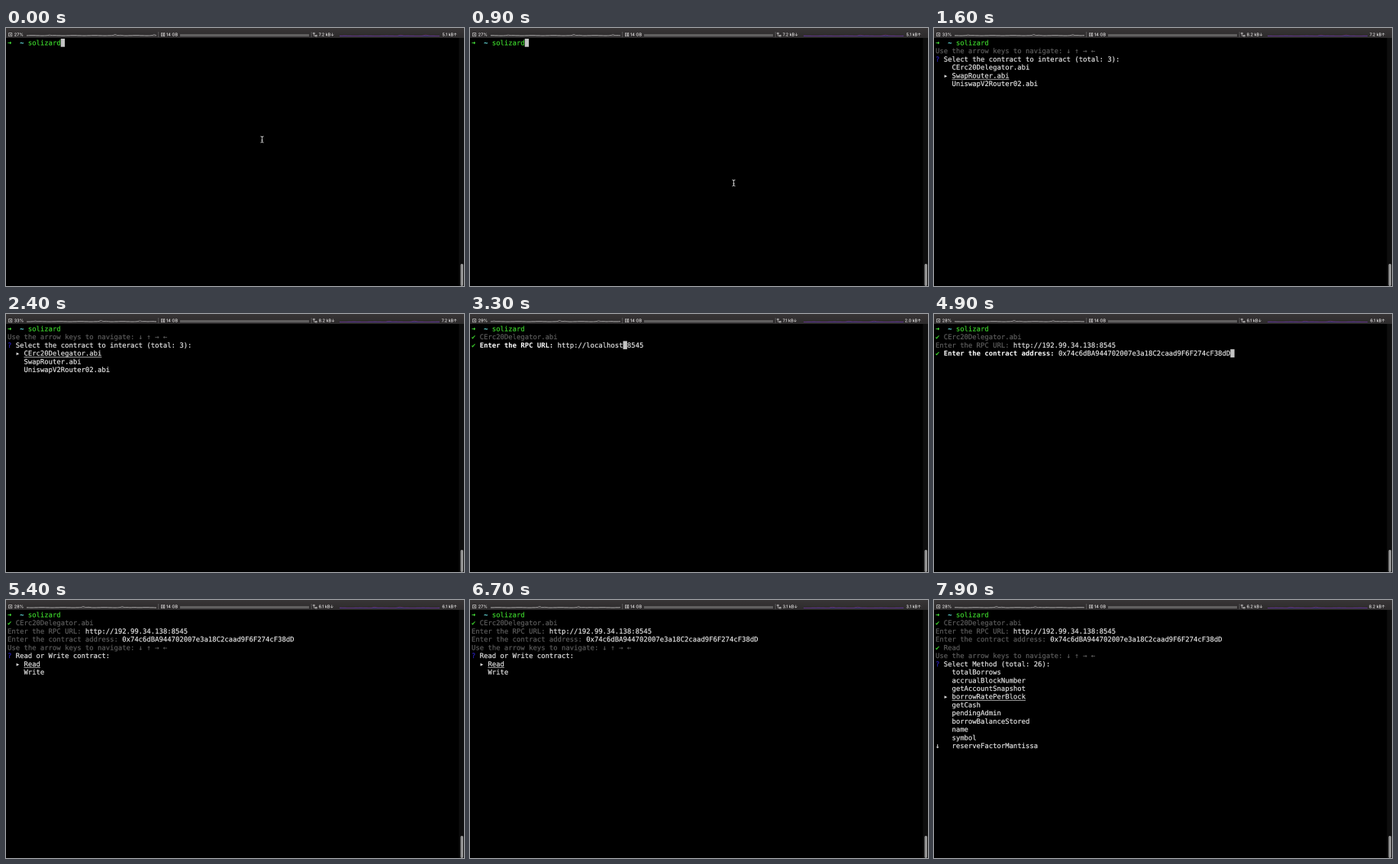
An HTML page with a canvas for the animation above (8000 ms loop, 600x338 px).

```html
<!DOCTYPE html>
<html lang="en">
<head>
<meta charset="utf-8">
<title>Terminal session</title>
<style>
html, body { margin: 0; width: 100%; height: 100%; overflow: hidden; background: #000; }
canvas { display: block; width: 600px; height: 338px; }
</style>
</head>
<body>
<canvas id="stage"></canvas>
<script>
const LOOP = 8000, W = 600, H = 338;
const CELL = 5.365, LINE = 10.72, LEFT = 2, TOP = 14;
const MONO = '8.912px "DejaVu Sans Mono", "Liberation Mono", monospace';
const UI = '500 5.5px Inter, "Open Sans", sans-serif';
const GREEN = '#3bcf2b', GRAY = '#5b5b5b', TEXT = '#dedede', WHITE = '#ffffff';

// Drawn at double size, so text keeps its fractional position when scaled down
const canvas = document.getElementById('stage');
const scale = 2 * (window.devicePixelRatio || 1);
canvas.width = W * scale;
canvas.height = H * scale;
const ctx = canvas.getContext('2d');
ctx.scale(scale, scale);
ctx.textRendering = 'geometricPrecision';
ctx.lineJoin = 'round';

const contracts = ['CErc20Delegator.abi', 'SwapRouter.abi', 'UniswapV2Router02.abi'];
const methods = ['totalBorrows', 'accrualBlockNumber', 'getAccountSnapshot', 'borrowRatePerBlock',
  'getCash', 'pendingAdmin', 'borrowBalanceStored', 'name', 'symbol', 'reserveFactorMantissa'];
const host = 'localhost', ip = '192.99.34.138', port = ':8545';
const address = '0x74c6dBA944702007e3a18C2caad9F6F274cF38dD';

// [start ms, CPU, download, upload]
const stats = [[0, '27%', '7.2', '5.1'], [1000, '33%', '8.2', '7.2'], [2700, '29%', '7.1', '2.0'],
  [3700, '27%', '17', '13'], [4700, '28%', '6.1', '6.1'], [5900, '27%', '3.1', '3.1'], [7100, '28%', '6.2', '8.2']];

// [start ms, chosen item]
const contractKeys = [[1000, 0], [1400, 1], [1900, 2], [2200, 1], [2400, 0]];
const modeKeys = [[5100, 0], [5800, 1], [6200, 0]];
const methodKeys = [[7000, 0], [7300, 1], [7400, 2], [7500, 3], [7600, 4], [7800, 3]];

const latest = (list, t) => list.filter(e => e[0] <= t).pop() || list[0];
const clamp = (v, a, b) => Math.min(b, Math.max(a, v));

function rect(x, y, w, h, color) {
  ctx.fillStyle = color;
  ctx.fillRect(x, y, w, h);
}

// A hairline stroke gives the glyphs a slightly heavier weight
function put(row, col, text, color = TEXT, bold = false) {
  ctx.font = (bold ? 'bold ' : '') + MONO;
  ctx.fillStyle = ctx.strokeStyle = color;
  ctx.lineWidth = 0.22;
  const y = TOP + 8.5 + row * LINE;
  [...text].forEach((ch, i) => {
    if (ch === ' ') return;
    const x = LEFT + (col + i) * CELL;
    ctx.fillText(ch, x, y);
    if (!bold) ctx.strokeText(ch, x, y);
  });
}

function cursor(row, col) {
  rect(LEFT + col * CELL, TOP + row * LINE, CELL, LINE, '#c4c4c4');
}

function done(row, text) {
  put(row, 0, '✔', GREEN, true);
  put(row, 2, text, GRAY);
}

function answered(row, label, value) {
  put(row, 0, label, GRAY);
  put(row, label.length + 1, value);
}

function prompt(row, label, value, at) {
  put(row, 0, '✔', GREEN, true);
  put(row, 2, label, WHITE, true);
  const col = label.length + 3;
  put(row, col, value);
  cursor(row, col + at);
}

function menu(row, label, items, chosen) {
  put(row, 0, 'Use the arrow keys to navigate: ↓ ↑ → ←', GRAY);
  put(row + 1, 0, '?', '#2a20b8');
  put(row + 1, 2, label);
  items.forEach((item, i) => {
    const r = row + 2 + i;
    put(r, 4, item);
    if (i === chosen) {
      put(r, 2, '▸');
      rect(LEFT + 4 * CELL, TOP + r * LINE + 10, item.length * CELL, 0.7, TEXT);
    }
  });
}

function rpcPrompt(t) {
  const label = 'Enter the RPC URL:', base = 'http://';
  const back = clamp(Math.floor((t - 2700) / 100), 0, port.length);
  const cut = clamp(Math.floor((t - 3350) / 40), 0, host.length);
  const name = t < 3800 ? host.slice(0, host.length - cut) : ip;
  const value = base + name + port;
  prompt(2, label, value, value.length - back);
}

function terminal(t) {
  put(0, 0, '➜', '#48e83c', true);
  put(0, 3, '~', '#6ff2f2', true);
  put(0, 5, 'solizard', GREEN);
  if (t < 1000) return cursor(0, 13);
  if (t < 2600) return menu(1, 'Select the contract to interact (total: 3):', contracts, latest(contractKeys, t)[1]);

  done(1, contracts[0]);
  if (t < 4000) return rpcPrompt(t);

  answered(2, 'Enter the RPC URL:', 'http://' + ip + port);
  if (t < 5100) {
    const value = t < 4700 ? '' : address;
    return prompt(3, 'Enter the contract address:', value, value.length);
  }

  answered(3, 'Enter the contract address:', address);
  if (t < 7000) return menu(4, 'Read or Write contract:', ['Read', 'Write'], latest(modeKeys, t)[1]);

  done(4, 'Read');
  menu(5, 'Select Method (total: 26):', methods, latest(methodKeys, t)[1]);
  put(16, 0, '↓');
}

function graph(x0, x1, y, shift, bumps, color) {
  ctx.strokeStyle = color;
  ctx.lineWidth = 0.6;
  ctx.beginPath();
  for (let x = x0; x <= x1; x++) {
    const s = x + shift;
    let h = 0.1 * Math.sin(s * 0.23);
    for (const [pos, size] of bumps) h += size * Math.exp(-(((s - pos) / 2.6) ** 2));
    ctx.lineTo(x, y - h);
  }
  ctx.stroke();
}

function label(text, x, align = 'left') {
  ctx.font = UI;
  ctx.fillStyle = '#eeecec';
  ctx.textAlign = align;
  ctx.fillText(text, x, 10.7);
  ctx.textAlign = 'left';
}

function icons() {
  ctx.strokeStyle = '#d0cece';
  ctx.lineWidth = 0.7;
  ctx.strokeRect(3.6, 6.6, 4.2, 4.2);
  rect(5, 8, 1.4, 1.4, '#d0cece');
  ctx.strokeRect(203.6, 6.6, 1.4, 4.2);
  ctx.strokeRect(206.4, 6.6, 1.4, 4.2);
  ctx.strokeRect(402.6, 6.2, 1.6, 1.6);
  ctx.strokeRect(405.6, 9.4, 1.6, 1.6);
  rect(403.1, 8, 0.6, 2.4, '#d0cece');
  rect(403.1, 9.9, 2.4, 0.6, '#d0cece');
}

function statusBar(t) {
  const fill = ctx.createLinearGradient(0, 0, 0, 13);
  fill.addColorStop(0, '#383536');
  fill.addColorStop(1, '#2d2b2c');
  rect(0, 0, W, 13, fill);
  icons();

  const [, cpu, down, up] = latest(stats, t);
  label(cpu, 10.8);
  label('14 GB', 210);
  label(down + ' kB↓', 409.6);
  label(up + ' kB↑', 591, 'right');
  for (const x of [199.5, 399.8]) rect(x, 5, 0.6, 7, '#777575');

  rect(27, 10.4, 170, 0.6, '#6f6d6d');
  graph(27, 197, 9.8, t * 0.00775,
    [[57, 0.7], [143, 1], [150, 0.6], [194, 0.9], [210, 0.5]], '#c4c2c2');
  rect(228, 8.5, 169, 2.4, '#555354');
  rect(228, 8.5, 169, 0.5, '#a09e9e');
  rect(228, 10.4, 169, 0.5, '#8c8a8a');

  const shift = t * 0.0063;
  rect(437, 10.3, 131, 0.7, '#4b3fae');
  graph(437, 568, 10.2, shift, [[517, 1.1], [550, 1.1]], '#6d2f6c');
}

function pointer(t) {
  if (t >= 1000) return;
  const p = clamp((t - 100) / 800, 0, 1);
  const x = 335.5 + 10 * p;
  const y = 146 + 57 * p + 143 * Math.sin(Math.PI * p);
  ctx.strokeStyle = '#cccccc';
  ctx.lineWidth = 0.9;
  ctx.beginPath();
  for (const side of [-1, 1]) {
    ctx.moveTo(x - 2, y + 4 * side);
    ctx.quadraticCurveTo(x, y + 4 * side, x, y + 2.6 * side);
    ctx.quadraticCurveTo(x, y + 4 * side, x + 2, y + 4 * side);
  }
  ctx.moveTo(x, y - 2.6);
  ctx.lineTo(x, y + 2.6);
  ctx.moveTo(x - 1.2, y + 1);
  ctx.lineTo(x + 1.2, y + 1);
  ctx.stroke();
}

function scrollbar() {
  rect(593.5, 13, 6.5, H - 13, '#0e0e0e');
  ctx.fillStyle = '#959595';
  ctx.beginPath();
  ctx.roundRect(595.5, 309, 3.5, 29, 1.7);
  ctx.fill();
}

function draw(now) {
  const t = now % LOOP;
  rect(0, 0, W, H, '#000');
  statusBar(t);
  terminal(t);
  scrollbar();
  pointer(t);
}

const start = performance.now();
function tick() {
  draw(performance.now() - start);
  requestAnimationFrame(tick);
}
tick();
</script>
</body>
</html>
```
